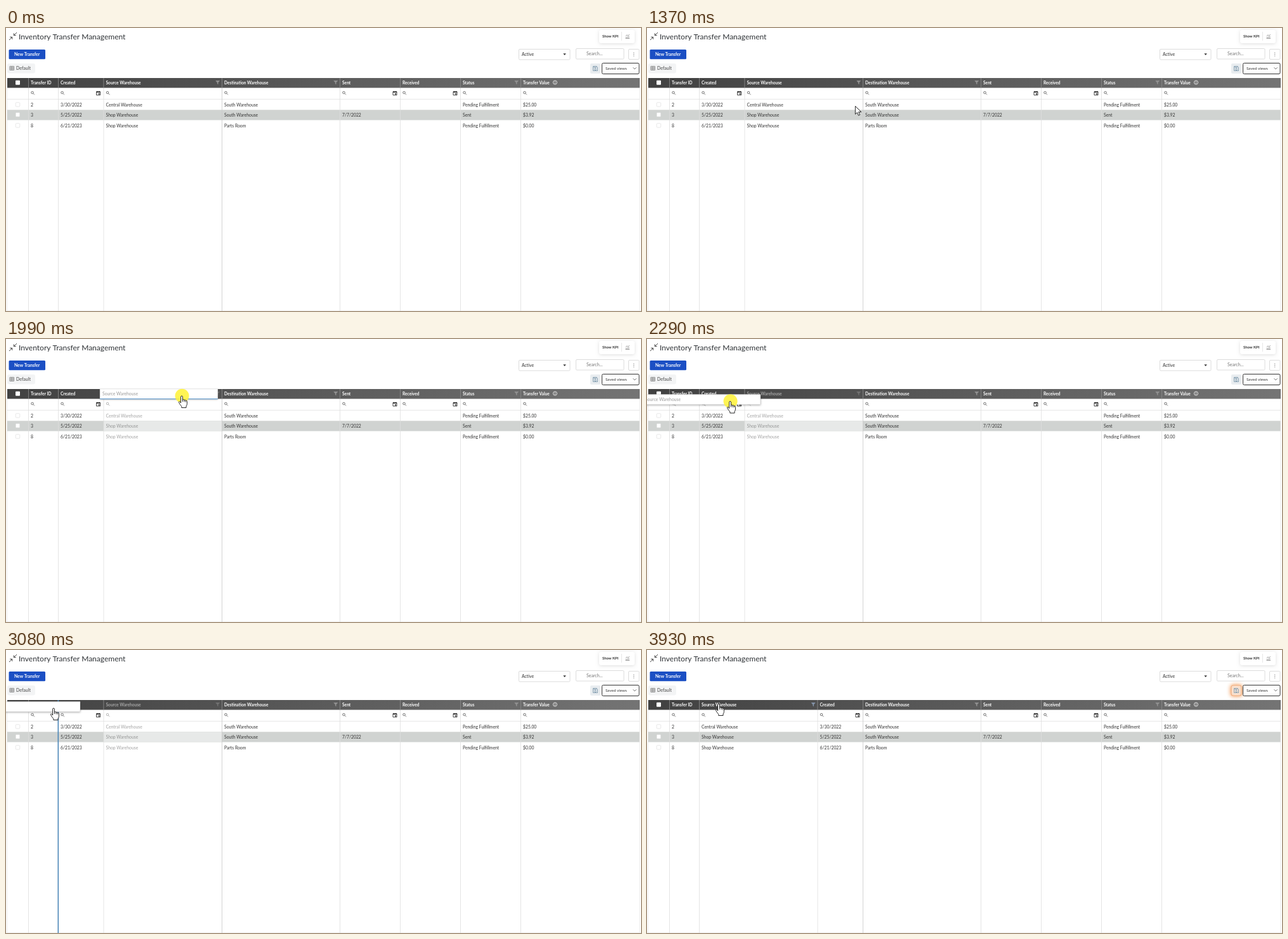
Write an HTML page with a canvas that moves like this. It is 1001x447 px and loops after 4400 ms.

```html
<!DOCTYPE html>
<html lang="en">
<head>
<meta charset="utf-8">
<title>Inventory Transfer Management</title>
<style>
  html, body { margin: 0; height: 100%; overflow: hidden; background: #fff; }
  canvas { display: block; }
</style>
</head>
<body>
<canvas id="stage" width="1001" height="447"></canvas>
<script>
const c = document.getElementById('stage').getContext('2d');
const LOOP = 4400, TICK = 76.7;
const GRAB = 1900, LINE = 2440, RELEASE = 3080, DROP = 3150;
const ROWS = [121, 137, 154];

// Pointer tip: time, x, y
const path = [
  [190, 957, 413], [266, 899, 364], [343, 848, 326], [420, 818, 307], [655, 818, 307],
  [757, 745, 300], [833, 680, 291], [987, 508, 241], [1063, 425, 204], [1140, 350, 171],
  [1217, 341, 152], [1370, 328, 123], [1524, 308, 96], [1677, 299, 89], [1834, 298, 89],
  [1907, 292, 89], [1984, 277, 90], [2137, 172, 96], [2214, 137, 98], [2291, 131, 98.5],
  [2367, 122, 98], [2444, 106, 96], [2751, 75, 92], [3390, 75, 92], [3923, 113, 85]
];

function tipAt(t) {
  const i = path.findIndex(k => k[0] > t);
  if (i < 1) return (i ? path[path.length - 1] : path[0]).slice(1);
  const a = path[i - 1], b = path[i], p = (t - a[0]) / (b[0] - a[0]);
  return [a[1] + (b[1] - a[1]) * p, a[2] + (b[2] - a[2]) * p];
}

function tick(t) {
  const start = [3080, 680, 190].find(s => t >= s);
  return start ? start + Math.floor((t - start + 15) / TICK) * TICK : 0;
}

function text(s, x, mid, size = 6.8, color = '#333', weight = 400) {
  c.font = `${weight} ${size}px Lato, sans-serif`;
  c.fillStyle = color;
  c.fillText(s, x, mid + size * 0.36);
}
function rect(x, y, w, h, color) {
  c.fillStyle = color;
  c.fillRect(x, y, w, h);
}
function box(x, y, w, h, r, fill, stroke, lw = 1) {
  c.beginPath();
  c.roundRect(x, y, w, h, r);
  if (fill) { c.fillStyle = fill; c.fill(); }
  if (stroke) { c.strokeStyle = stroke; c.lineWidth = lw; c.stroke(); }
}
function draw(x, y, d, stroke, lw = 1, fill) {
  const p = new Path2D(d);
  c.save();
  c.translate(x, y);
  if (fill) { c.fillStyle = fill; c.fill(p); }
  if (stroke) { c.strokeStyle = stroke; c.lineWidth = lw; c.lineJoin = 'round'; c.stroke(p); }
  c.restore();
}
function shadow(color, blur, dy = 0) {
  c.shadowColor = color;
  c.shadowBlur = blur;
  c.shadowOffsetY = dy;
}
function noShadow() { shadow('transparent', 0); }

function disk(x, y, r, color) {
  c.beginPath();
  c.arc(x, y, r, 0, 7);
  c.fillStyle = color;
  c.fill();
}

function toolbar(glow) {
  draw(5, 7, 'M12 0L7.3 4.7M7.3 1.3V4.7H10.8M0 12L4.7 7.3M1.2 7.3H4.7V10.8', '#333', 0.9);
  text('Inventory Transfer Management', 20, 13.6, 12, '#2f3337');

  shadow('rgba(0,0,0,.13)', 5, 1);
  box(935, 3, 56, 21, 3, '#fff');
  noShadow();
  text('Show KPI', 940, 13.3, 5.9, '#333', 700);
  rect(970, 6, 0.7, 14, '#ddd');
  draw(976, 10, 'M.5 6.5H7M1.5 6V4M3.5 6V3.3M5.7 6V2.5M.8 2.5L3 1L4.5 2L6.8 .3', '#777', 0.7);

  box(4.5, 34, 57.5, 15.3, 1.5, '#1b4fc4');
  text('New Transfer', 13, 41.6, 6.75, '#fff', 700);

  box(808.5, 33.5, 80.5, 16.5, 1.5, '#fff', '#dcdcdc');
  text('Active', 813, 41.7, 6.9);
  draw(878.3, 40.3, 'M0 0H4.6L2.3 2.6Z', null, 0, '#333');
  box(898.5, 32.5, 75.5, 16.5, 1.5, '#fff', '#dcdcdc');
  text('Search...', 915, 40.5, 7, '#777');
  box(981.5, 33.5, 16.5, 16, 1.5, '#fff', '#dcdcdc');
  for (const y of [39, 41.5, 44]) disk(989.7, y, 0.6, '#555');

  box(2, 56, 44, 15.5, 3, '#f3f4f5');
  draw(6, 60.5, 'M0 0H6.5V6H0ZM0 2H6.5M0 4H6.5M3.2 0V6', '#777', 0.8);
  text('Default', 16, 63.7, 7, '#444');

  box(921, 56, 16, 16, 2, '#e9edf0');
  if (glow > 0) {
    c.globalAlpha = glow;
    shadow('#f08a3c', 6);
    box(921, 56, 16, 16, 3, '#fbeee4', '#f3b184', 1.2);
    noShadow();
    c.globalAlpha = 1;
  }
  draw(925.5, 60.5, 'M0 0H5.6L7 1.4V7H0ZM1.6 0V2H4.8V0M2 4.8a1.5 1.3 0 1 0 3 0a1.5 1.3 0 1 0 -3 0', '#7190a5', 0.8);
  box(939.5, 55.5, 58.5, 17, 2, '#fff', '#333');
  text('Saved views', 945, 63.7, 6.3);
  draw(988.5, 62.3, 'M0 0L2.6 2.7L5.2 0', '#555', 0.8);
}

// Columns from left to right; the dragged one changes places with Created
function columns(moved) {
  const created = { name: 'Created', w: 71.5, date: 1, cells: ['3/30/2022', '5/25/2022', '6/21/2023'] };
  const source = { name: 'Source Warehouse', w: 186.5, filter: 1, cells: ['Central Warehouse', 'Shop Warehouse', 'Shop Warehouse'] };
  const cols = [
    { name: 'Transfer ID', w: 47, plain: 1, cells: ['2', '3', '8'] },
    ...(moved ? [source, created] : [created, source]),
    { name: 'Destination Warehouse', w: 186, filter: 1, cells: ['South Warehouse', 'South Warehouse', 'Parts Room'] },
    { name: 'Sent', w: 95, date: 1, cells: ['', '7/7/2022', ''] },
    { name: 'Received', w: 95, date: 1, cells: ['', '', ''] },
    { name: 'Status', w: 95, filter: 1, cells: ['Pending Fulfillment', 'Sent', 'Pending Fulfillment'] },
    { name: 'Transfer Value', w: 187.5, info: 1, cells: ['$25.00', '$3.92', '$0.00'] }
  ];
  let x = 35.5;
  for (const col of cols) { col.x = x; x += col.w; }
  return cols;
}

function table(moved, dragging) {
  const grad = c.createLinearGradient(2, 0, 999, 0);
  grad.addColorStop(0, '#414141');
  grad.addColorStop(1, '#747474');
  rect(2, 79, 997, 15.5, grad);
  rect(2, 112, 997, 0.8, '#e2e2e2');
  rect(2, 129.3, 997, 16.2, '#d0d3d1');
  rect(1, 95, 0.7, 352, '#e6e6e6');
  rect(998.5, 95, 0.7, 352, '#e6e6e6');
  rect(0, 446, 1001, 1, '#f0f0f0');

  box(15, 82.7, 7, 7, 1, '#fff');
  for (const y of ROWS) box(15.3, y - 3.3, 6.4, 6.4, 1, '#fff', '#dedede', 0.7);

  for (const col of columns(moved)) {
    const { x, w } = col, right = x + w;
    const faded = dragging && col.name === 'Source Warehouse';
    if (faded) rect(x, 129.3, w, 16.2, '#e7e9e8');
    rect(x - 0.5, 79, 0.8, 15.5, '#8d8d8d');
    rect(x - 0.4, 95, 0.8, 352, x === 340.5 ? '#c9c9c9' : '#dedede');

    c.globalAlpha = faded ? 0.5 : 1;
    text(col.name, x + 3.5, 86.2, 6.6, '#fff', 700);
    if (col.filter) draw(right - 10.3, 83, 'M0 0H7L4.3 3.2V6.2L2.7 5.2V3.2Z', null, 0, moved && col.name[1] === 'o' ? '#8291a6' : '#8f8f8f');
    if (col.info) draw(865.5, 86, 'M3 0a3 3 0 1 1 -6 0a3 3 0 1 1 6 0M0 -.4V1.7M0 -1.8V-1', '#fff', 0.8);
    draw(x + 4, 100, 'M3.8 2a1.8 1.8 0 1 1 -3.6 0a1.8 1.8 0 1 1 3.6 0M3.4 3.4L5.4 5.4', '#555', 0.8);
    if (col.date) {
      draw(right - 11.5, 100, 'M0 .5H6V6H0ZM1.3 -.5V1M4.7 -.5V1', '#333', 0.9);
      rect(right - 11.5, 100.5, 6, 1.4, '#333');
      rect(right - 8.4, 103.2, 2, 2, '#333');
    }
    c.globalAlpha = faded ? 0.45 : 1;
    col.cells.forEach((s, i) => text(s, x + 3.5, ROWS[i] + 0.1, 6.8));
    c.globalAlpha = 1;
  }
}

function dragCard(t) {
  const [px, py] = tipAt(t - TICK), x = px - 144, y = py - 10.5;
  shadow('rgba(0,0,0,.35)', 3, 1);
  rect(x, y, 186, 16, '#fff');
  noShadow();
  box(x + 0.3, y + 0.3, 185.4, 15.6, 0, null, '#d0d0d0', 0.6);
  if (t < 2050) rect(x, y + 15.6, 186, 1.1, '#5f9bd0');
  text('Source Warehouse', x + 4, y + 8, 6.8, '#999');
}

function pointer(t) {
  const [x, y] = tipAt(t);
  if (t >= GRAB && t < RELEASE - 5) disk(x + 0.5, y - 0.3, 11, 'rgba(255,243,60,.88)');
  if (t < 1590) {
    draw(x, y, 'M.4 .5V13.2L3.4 10.5L5.4 15.2L7.6 14.2L5.6 9.7H9.8Z', '#111', 0.9, '#fff');
  } else {
    draw(x, y, 'M-1.4 11V1.2Q-1.4 0 0 0T1.4 1.2V6Q2.8 5 4 6.4Q5.3 5.7 6.2 7.1Q8.4 6.6 8.4 8.8V12.5Q8.4 14.5 7 16V18.5H-.2V16.5Q-2.6 14 -4.4 10.5Q-5 9 -3.6 8.8Q-2.6 8.8 -1.4 11M1.4 6V9M4 6.6V9.3M6.2 7.4V9.6', '#111', 0.9, '#fff');
  }
}

function frame() {
  const t = tick(performance.now() % LOOP);
  const dragging = t >= GRAB && t < DROP;
  rect(0, 0, 1001, 447, '#fff');
  toolbar(Math.min(1, (t - 3400) / 523));
  table(t >= DROP, dragging);
  if (dragging) {
    if (t >= LINE) rect(81.5, 79, 1.6, 368, '#4d87b8');
    dragCard(t);
  }
  if (t) pointer(t);
  requestAnimationFrame(frame);
}
frame();
</script>
</body>
</html>
```
